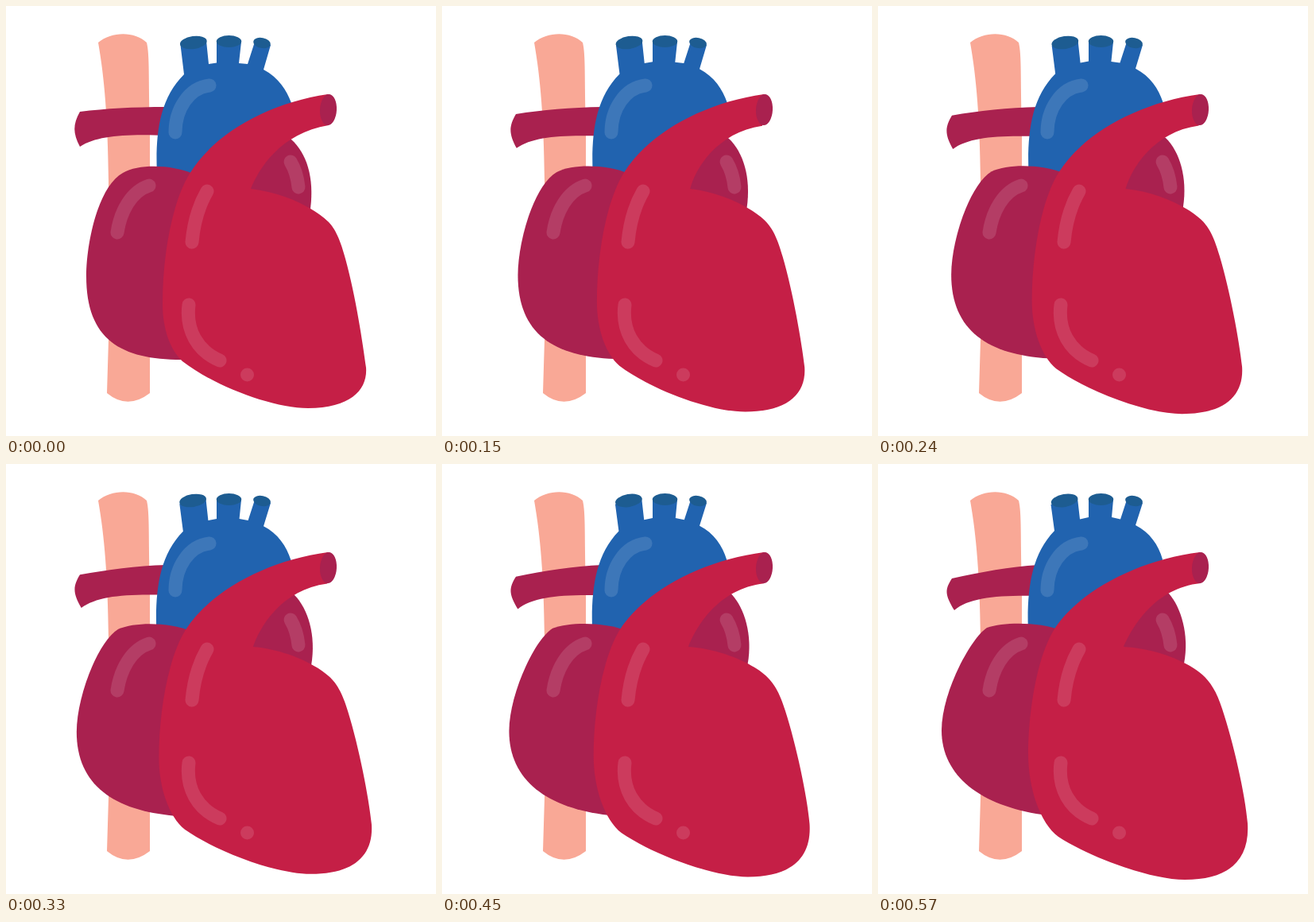
Recreate the animation shown at these times as an HTML page. Size 541 px wide and 541 px high, loop 600 ms.

```html
<!DOCTYPE html>
<html lang="en">
<head>
<meta charset="utf-8">
<title>Beating heart</title>
<style>
  html, body { margin: 0; width: 100%; height: 100%; overflow: hidden; background: #fff; }
  svg { display: block; width: 100vw; height: 100vh; }
  .skin { fill: #f9a896; }
  .maroon { fill: #a9214f; }
  .blue { fill: #2163af; }
  .navy { fill: #1d5c91; }
  .red { fill: #c51f46; }
  .shine { fill: none; stroke: #fff; stroke-opacity: .125; stroke-width: 17; stroke-linecap: round; }
</style>
</head>
<body>
<svg viewBox="0 0 541 541">
  <path class="skin" d="M116 46C133 31.5 162 31.5 177 46C181 62 179 95 181 150V487Q153 508.500 127 487L129 420V220C128 140 124 92 116 46Z"/>
  <path class="maroon" id="vein"/>
  <path class="blue" id="aorta"/>
  <ellipse class="navy" id="rim" rx="17" ry="8"/>
  <ellipse class="navy" cx="280.500" cy="44.500" rx="15.700" ry="7.500"/>
  <ellipse class="navy" cx="322" cy="46.500" rx="11" ry="6.500" transform="rotate(12 322 46.500)"/>
  <path class="maroon" id="rightAtrium"/>
  <path class="maroon" id="leftAtrium"/>
  <path class="red" id="ventricle"/>
  <ellipse class="maroon" cx="405.500" cy="130.500" rx="10.500" ry="19.500" transform="rotate(3 405.500 130.500)"/>
  <g class="shine">
    <path d="M256 100C230 103 213 130 213 159"/>
    <path d="M180 226C158 233 144 258 140 285"/>
    <path d="M253 233C242 252 236 275 234 297"/>
    <path d="M230 376C226 408 241 434 269 446"/>
    <path d="M358 196Q366 209 368 228"/>
    <path d="M303.500 464h.01"/>
  </g>
</svg>
<script>
const LOOP = 600, STEP = 30, LAST = LOOP / STEP - 1;
const byId = id => document.getElementById(id);

// Each part swells from its relaxed outline to its full outline.
const outlines = {
  vein: [
    'M93 133C125 129 160 127 202 127L202 163C150 161 115 163 93 177C84 160 84 149 93 133Z',
    'M93 144C130 136 165 129 202 127L202 166C150 165 115 168 96 184C84 164 84 158 93 144Z'
  ],
  aorta: [
    'M190 215C188 165 191 119 224 86L219.5 49L252 44L255 73L265 71.500L265 45L296 45L293 72L304 73L313 45L333 49L324 80C343 90 353 106 359 122L330 215Z',
    'M189 215C187 163 191 116 222 84L217.5 51L251 43L254 69.500L265 67L265 45L296 45L294 67L305 69.500L313 45L333 49L324 77C342 86 353 102 358 120L330 215Z'
  ],
  rightAtrium: [
    'M330 150L359 168C378 185 388 215 383 255L300 240Z',
    'M330 150L366 163C381 180 392 215 385 251L300 240Z'
  ],
  leftAtrium: [
    'M235 211C210 200 168 198 147 210C115 228 101 300 101 340C101 420 145 445 221 445L245 440Z',
    'M230 209C205 199 160 198 137 206C116 220 80 288 80 335C80 393 130 430 206 441L245 440Z'
  ]
};

const ventricle = [
  'M405 111C330 122 262 160 231 211C210 245 197 310 197 375C197 405 206 432 222 447' +
  'C262 478 335 506 380 506C435 506 455 482 453 455C449 425 440 365 427 318C419 288 412 278 405 271',
  'M405 111C325 121 253 161 223 206C198 245 189 318 189 365C189 408 204 452 227 469' +
  'C262 492 340 523 386 523C440 523 468 500 465 452C462 415 447 350 433 308C426 286 418 274 408 265'
];

const lerp = (a, b, p) => a + (b - a) * p;

function morph([from, to], p) {
  const ends = to.match(/[\d.]+/g);
  let i = 0;
  return from.replace(/[\d.]+/g, n => lerp(+n, +ends[i++], p).toFixed(2));
}

function draw(time) {
  const p = Math.floor(time % LOOP / STEP) / LAST;
  for (const id in outlines) byId(id).setAttribute('d', morph(outlines[id], p));

  // The notch under the artery opens quickly and settles back slowly.
  const bump = Math.min(p / .26, (1 - p) / .74);
  const notch = lerp(308, 309, p) + 4 * bump;
  const cleft = `C${lerp(388, 390, p)} ${lerp(255, 249, p)} ${lerp(352, 350, p)} ${lerp(235, 232, p)} ${notch} 230` +
    `C${lerp(318, 320, p)} 205 ${lerp(345, 348, p)} ${lerp(160, 156, p)} ${406 - 3 * bump} ${150 + bump * .7}Z`;
  byId('ventricle').setAttribute('d', morph(ventricle, p) + cleft);

  const x = lerp(235.8, 234.6, p);
  byId('rim').setAttribute('transform', `translate(${x} 46) rotate(${lerp(-8, -10, p)})`);
}

function tick(now) {
  draw(now);
  requestAnimationFrame(tick);
}

draw(0);
requestAnimationFrame(tick);
</script>
</body>
</html>
```
